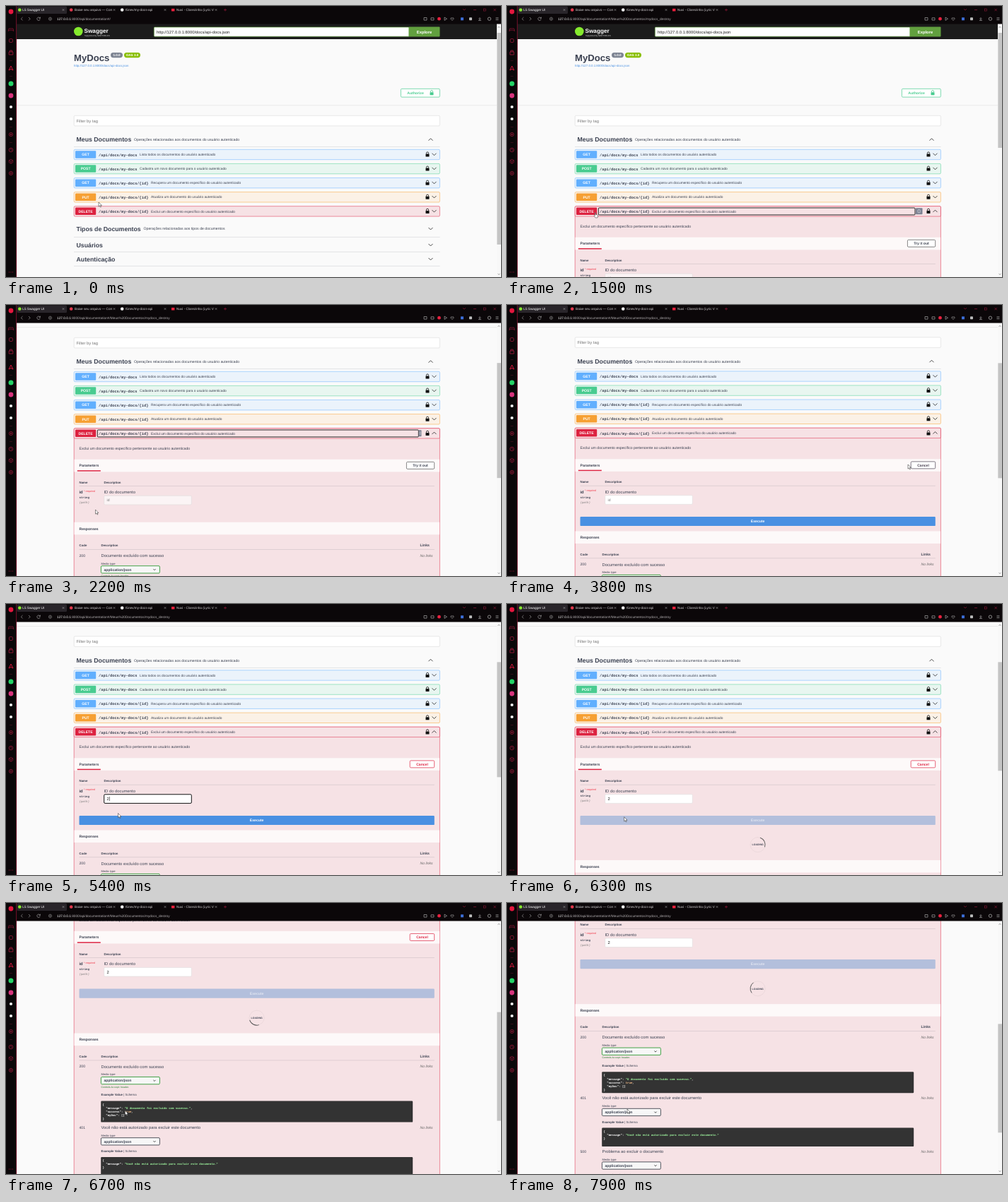
An HTML page that plays this animation: 700 px wide and 384 px high, repeating every 8 s.

```html
<!DOCTYPE html>
<html lang="pt-BR">
<head>
<meta charset="utf-8">
<title>MyDocs</title>
<style>
html, body { margin: 0; width: 100%; height: 100%; overflow: hidden; background: #0b0709; }
svg { display: block; }
text { font-family: "Liberation Sans", Arial, sans-serif; white-space: pre; text-rendering: geometricPrecision; }
.b { font-weight: bold; }
.i { font-style: italic; }
.m { font-family: "Liberation Mono", monospace; }
.c { text-anchor: middle; }
</style>
</head>
<body>
<svg id="stage" width="700" height="384" viewBox="0 0 700 384"></svg>
<script>
const LOOP = 8000, INK = '#3b4151', RED = '#dd2240', GREEN = '#49cc90', PINK = '#f6e2e5', CRIMSON = '#a81a3d';
const OPEN = 1100, TRY = 3700, FOCUS = 4950, TYPE = 5250, RUN = 6200;

// Markup helpers: text is placed by its vertical middle
const rect = (x, y, w, h, fill, more = '') =>
  `<rect x="${x}" y="${y}" width="${w}" height="${h}" fill="${fill}" ${more}/>`;
const box = (x, y, w, h, fill, stroke, width = .5, r = 1.4, more = '') =>
  rect(x, y, w, h, fill, `stroke="${stroke}" stroke-width="${width}" rx="${r}" ${more}`);
const text = (x, y, size, str, fill = INK, cls = '', more = '') =>
  `<text x="${x}" y="${y + size * .35}" font-size="${size}" fill="${fill}" class="${cls}" ${more}>${str}</text>`;
const line = (d, stroke, width = .6, more = '') =>
  `<path d="${d}" fill="none" stroke="${stroke}" stroke-width="${width}" ${more}/>`;
const dot = (x, y, r, fill, more = '') => `<circle cx="${x}" cy="${y}" r="${r}" fill="${fill}" ${more}/>`;
const ring = (x, y, r, stroke, width = .7) => dot(x, y, r, 'none', `stroke="${stroke}" stroke-width="${width}"`);
const group = (id, content) => `<g id="${id}">${content}</g>`;
const chevron = (x, y, up, size = 3) => {
  const k = up ? -1 : 1;
  return line(`M${x - size} ${y - size / 2 * k}l${size} ${size * k}l${size} ${-size * k}`, '#222', .8);
};
const lock = (x, y, fill = '#111') => rect(x - 2.5, y - 1, 5, 4, fill, 'rx=".5"') +
  line(`M${x - 1.6} ${y - 1}v-1a1.6 1.6 0 0 1 3.2 0v1`, fill, .8);
const rule = y => rect(96, y, 517.6, .4, INK, 'opacity=".3"');

function tag(y, name, about = '', x = 0, up = false) {
  return text(99.5, y, 8.75, name, INK, 'b') + text(x, y, 5.18, about) + chevron(600.5, y, up);
}

function operation(y, method, path, about, color, tint) {
  const x = path.includes('{') ? 205 : 189;
  return box(96.2, y - 7.2, 517.2, 14.4, tint, color) + rect(98, y - 5.3, 29.2, 10.5, color, 'rx="1"') +
    text(112.6, y, 5.1, method, '#fff', 'b c') + text(131, y + .3, 5.33, path, INK, 'b m') +
    text(x, y, 4.82, about) + lock(596, y);
}

function browser() {
  const tabs = [
    [97, 'Baixe seu arquivo — Com', '#e0384c', 153], [169, 't5nev/my-docs-api', '#eee', 225],
    [241, 'Nuvi - Clarezinha (Lyric V', '#f0203c', 297]
  ];
  const cross = x => line(`M${x - 1.3} 4.2l2.6 2.6m0 -2.6l-2.6 2.6`, '#bbb', .5);
  let s = rect(0, 0, 700, 25.5, '#0b0709') + rect(0, 0, 14.5, 384, '#0b0709') +
    rect(15.5, .5, 70.5, 10.5, '#29252a', 'rx="1.5"') + dot(19.3, 5.5, 2.3, '#85ea2d') +
    text(23.3, 5.6, 4.7, 'L5 Swagger UI', '#fff') + cross(81);
  for (const [x, title, color, end] of tabs) {
    s += (x === 241 ? rect(x - 7, 3.8, 4.4, 3.6, color) : dot(x - 4.8, 5.5, 2.3, color)) +
      text(x, 5.6, 4.7, title, '#d5d2d4') + rect(end - 3, 1, 6, 9, '#0b0709') + cross(end);
  }
  s += line('M308 5.5h4m-2 -2v4', CRIMSON) +
    line('M646 4l2 2l2 -2M661 5.5h4M689.5 3.8l3.4 3.4m0 -3.4l-3.4 3.4', CRIMSON) +
    box(675.5, 4, 3, 3, 'none', CRIMSON, .5, 0) +
    line('M23.5 16l-2.2 2.2l2.2 2.2M32 16l2.2 2.2l-2.2 2.2', '#bbb') +
    line('M48 17.2a2.2 2.2 0 1 0 .2 1.6M48.4 15.6v1.8h-1.8', '#bbb') +
    ring(62.5, 18.2, 2.2, '#999', .5) + line('M60.3 18.2h4.4M62.5 16v4.4', '#999', .4) +
    `<text x="72" y="19.9" font-size="4.75" fill="#fff">127.0.0.1<tspan fill="#b3afb1">:8000/api/documentation#/<tspan id="hash"></tspan></tspan></text>`;
  s += line('M591 16.5h4v3.6h-4zM601 16.8h4v3.2h-4z', '#bbb') + dot(612.5, 18.2, 2.4, '#e8213f') +
    line('M620 16l3.6 2.2l-3.6 2.2z', '#bbb') +
    line('M631 20.4l-2.2 -2.2q0 -2.2 2.2 -1q2.2 -1.2 2.2 1z', '#bbb') +
    rect(643, 16.3, 4, 4, '#3c6fd8') + rect(655, 16.3, 4, 4, '#bbb', 'rx=".8"') +
    line('M670 16v3.2m-1.6 -1.4l1.6 1.6l1.6 -1.6M668 20.5h4', '#bbb') + ring(683.5, 18.2, 2.2, '#bbb') +
    line('M692.5 16.6h4m-4 1.6h4m-4 1.6h4', '#bbb', .5);

  s += dot(7, 8, 3.4, '#e3173e') + rect(14.3, 0, .8, 384, '#8d1434') +
    line('M4 32h6l.8 3.5l-2 -1.3h-3.6l-2 1.3z', CRIMSON) + box(4.5, 46.5, 5, 5, 'none', CRIMSON, .7) +
    line('M4.2 65h5.6v4h-5.6zM5.5 65v-2h3v2', CRIMSON, .8) + line('M4 91l3 -6l3 6l-3 -1.6z', '#e3173e', .9) +
    dot(7, 110, 3.5, '#25d366') + dot(7, 127, 3.4, '#d8327c') + dot(7, 143, 2.1, '#eee') + dot(7, 160, 2.1, '#eee') +
    ring(7, 182, 2.6, CRIMSON) + dot(7, 182, 1, CRIMSON) + ring(7, 204, 2.8, CRIMSON) + line('M7 202v2l1.5 1', CRIMSON) +
    line('M7 217.2l2.7 1.5v3l-2.7 1.5l-2.7 -1.5v-3zM4.3 218.7l2.7 1.5l2.7 -1.5M7 220.2v3', CRIMSON) +
    ring(7, 237, 2.6, CRIMSON) + ring(7, 237, .9, CRIMSON);
  for (const y of [77, 99, 171, 193]) s += rect(5, y, 4, .5, '#5b1226');
  return s + [4.5, 7, 9.5].map(x => dot(x, 377, .6, CRIMSON)).join('');
}

function header() {
  const address = 'http://127.0.0.1:8000/docs/api-docs.json';
  return rect(15, 25, 679, 22, '#1b1b1b') + dot(102.3, 36, 6.3, '#85ea2d') +
    text(110.5, 35, 8.2, 'Swagger', '#fff', 'b') + text(111, 42, 2.9, 'Supported by NORTHELKS', '#ddd') +
    box(209.3, 30, 361, 13.2, '#fff', '#62a03f', .7, 1) + text(213, 36.5, 5.83, address, '#222') +
    rect(569.5, 29.6, 44, 14, '#62a03f', 'rx="1"') + text(591.5, 36.6, 5.83, 'Explore', '#fff', 'b c') +
    text(96, 73, 13.1, 'MyDocs', INK, 'b') +
    rect(148, 66, 17, 7.2, '#7d8492', 'rx="3.6"') + text(156.5, 69.6, 4.6, '1.0.0', '#fff', 'b c') +
    rect(167, 66, 23, 7.2, '#89bf04', 'rx="3.6"') + text(178.5, 69.6, 4.6, 'OAS 3.0', '#fff', 'b c') +
    text(96, 84.8, 4.37, address, '#4990e2') + rect(15, 140.6, 679, .5, '#d9d9d9') +
    box(558.4, 117.3, 55, 11.8, '#fff', GREEN, .7) + text(579, 123.4, 5.1, 'Authorize', GREEN, 'b c') + lock(602, 123.2, GREEN) +
    box(96.2, 155.3, 517.2, 14.6, '#fff', '#d0d0d0') + text(99.5, 162.6, 5.83, 'Filter by tag', '#757575');
}

function operations() {
  const list = '/api/docs/my-docs', one = list + '/{id}';
  const rows = [
    ['GET', list, 'Lista todos os documentos do usuário autenticado', '#61affe', '#ebf3fb'],
    ['POST', list, 'Cadastra um novo documento para o usuário autenticado', GREEN, '#e8f6f0'],
    ['GET', one, 'Recupera um documento específico do usuário autenticado', '#61affe', '#ebf3fb'],
    ['PUT', one, 'Atualiza um documento do usuário autenticado', '#f6a033', '#fbf1e6'],
    ['DELETE', one, 'Exclui um documento específico do usuário autenticado', RED, PINK]
  ];
  return tag(189.2, 'Meus Documentos', 'Operações relacionadas aos documentos do usuário autenticado', 181, true) + rule(199.5) +
    group('body', box(96.2, 283.8, 517.2, 560, PINK, RED)) +
    rows.map((row, i) => operation(210.5 + 20.1 * i, ...row) + (i < 4 ? chevron(605.5, 210.2 + 20.1 * i) : '')).join('') +
    group('closed', chevron(605.5, 290.6) +
      tag(315.5, 'Tipos de Documentos', 'Operações relacionadas aos tipos de documentos', 194.5) + rule(327.5) +
      tag(338.5, 'Usuários') + rule(348) + tag(358.5, 'Autenticação') + rule(368.5)) +
    box(129.3, 286, 448, 10, 'none', '#111', .9, 1, 'id="outline"') +
    group('copy', rect(0, 286.3, 9.5, 9, '#7d8293', 'rx="1"') + box(3, 288.7, 3.2, 4, 'none', '#fff', .5, .4));
}

function parameters() {
  return chevron(605.5, 290.6, true) +
    text(103.5, 311.8, 5.18, 'Exclui um documento específico pertencente ao usuário autenticado') +
    rect(96.5, 327.8, 516.6, 17.6, '#fdf9f9') + text(103.5, 336.4, 5.1, 'Parameters', INK, 'b') +
    rect(100.8, 343.2, 33, 1.5, RED) +
    group('try', box(566.4, 331.4, 39.3, 10, '#fff', '#555', .7) + text(586, 336.4, 5.1, 'Try it out', INK, 'b c')) +
    group('cancel', box(571.2, 331.4, 34.5, 10, '#fff', 'currentColor', .7) + text(588.5, 336.4, 5.1, 'Cancel', 'currentColor', 'b c')) +
    text(103.5, 360, 4.37, 'Name', INK, 'b') + text(138.5, 360, 4.37, 'Description', INK, 'b') +
    rect(103.5, 365.4, 502.3, .4, INK, 'opacity=".3"') +
    text(103.5, 374, 5.83, 'id', INK, 'b') + text(110, 372.3, 3.65, '* required', '#f03040') +
    text(103.5, 381.6, 4, 'string', INK, 'b m') + text(103.5, 388.6, 4, '(path)', '#777', 'm i') +
    text(138.5, 374, 5.83, 'ID do documento') +
    box(138.7, 379.3, 123.6, 12.6, '#fff', '#d9d9d9', .5, 1.4, 'id="field"') +
    text(142.5, 385.6, 5.1, 'id', '#777', '', 'id="hint"') + text(142.5, 385.6, 5.8, '2', '#222', '', 'id="typed"') +
    rect(146, 382.4, .5, 6.2, '#111', 'id="caret"') +
    group('execute', rect(103.5, 409.4, 502.3, 13.2, '#4990e2', 'rx="1.2" id="bar"') +
      text(354.6, 416, 5.1, 'Execute', '#fff', 'b c', 'id="label"')) +
    group('loading', ring(354.6, 450.6, 10.5, '#55555518') +
      line('M347.18 443.18a10.5 10.5 0 0 1 14.84 0', '#555', .9, 'id="arc"') +
      text(354.6, 450.6, 3.5, 'LOADING', INK, 'b c'));
}

// Responses are laid out around the middle of their title bar
function responses() {
  const str = s => `<tspan fill="#a2fca2">${s}</tspan>`;
  const code = (y, h, lines) => rect(134.2, y, 441, h, '#333', 'rx="1.2"') +
    lines.map((s, i) => text(136.5, y + 4.8 + 5.15 * i, 4, s, '#fff', 'b m')).join('');
  const response = (y, status, about, accent) => {
    const first = accent ? 1 : 0;
    return text(103.5, y, 5.1, status) + text(134.5, y, 5.83, about) + text(585.5, y, 5.1, 'No links', '#666', 'i') +
      text(134.5, y + 11.5, 4.1, 'Media type') +
      box(134.4, y + 14.9, 83, 10.3, '#f7f7f7', accent || '#41444e', .9) +
      text(138.5, y + 20.1, 5.1, 'application/json', INK, 'b') + chevron(210, y + 20.1, false, 1.6) +
      (first ? text(134.5, y + 29, 3.5, 'Controls <tspan class="m">Accept</tspan> header.', '#1f7a2a') : '') +
      text(134.5, y + 33.8 + 6.5 * first, 4.37, '<tspan class="b">Example Value</tspan> | Schema');
  };
  return rect(96.5, -9, 516.6, 17.5, '#fdf9f9') + text(103.5, 0, 5.1, 'Responses', INK, 'b') +
    text(103.5, 23.5, 4.37, 'Code', INK, 'b') + text(134.5, 23.5, 4.37, 'Description', INK, 'b') +
    text(585.5, 23.5, 5.1, 'Links', INK, 'b') + rect(103.5, 29.2, 502.3, .4, INK, 'opacity=".3"') +
    response(38, '200', 'Documento excluído com sucesso', '#2f9a36') +
    code(87, 30, ['{', `  "message": ${str('"O documento foi excluído com sucesso."')},`,
      '  "success": <tspan fill="#fcc28c">true</tspan>,', '  "myDoc": []', '}']) +
    response(124.2, '401', 'Você não está autorizado para excluir este documento') +
    code(166.4, 26.5, ['{', `  "message": ${str('"Você não está autorizado para excluir este documento."')}`, '}']) +
    response(199.8, '500', 'Problema ao excluir o documento');
}

document.getElementById('stage').innerHTML =
  rect(15, 25, 685, 359, '#fafafa') +
  `<svg x="15" y="25" width="679" height="359" viewBox="15 25 679 359">` +
  group('page', header() + operations() + group('open', parameters() + group('responses', responses()))) + '</svg>' +
  rect(694, 25, 6, 359, '#f8f8f8') + line('M695.5 31l1.5 -2l1.5 2M695.5 379l1.5 2l1.5 -2', '#888') +
  rect(694.4, 38, 5.6, 300, '#c4c4c4', 'id="thumb"') + browser() +
  group('cursor',
    '<path id="arrow" d="M0 0v6.2l1.5 -1.3l1 2.2l1 -.5l-1 -2.1h1.9z" fill="#fff" stroke="#222" stroke-width=".5"/>' +
    '<path id="hand" d="M-.6 0q.6 -.8 1.2 0v2.4l2.6 .6q.6 .3 .4 1.2l-.6 2.8h-3l-2 -2.6q0 -1 1.4 -.2z" fill="#fff" stroke="#222" stroke-width=".5"/>');

const el = Object.fromEntries([...document.querySelectorAll('[id]')].map(e => [e.id, e]));
const show = (name, on) => el[name].style.display = on ? '' : 'none';
const set = (name, values) => { for (const k in values) el[name].setAttribute(k, values[k]); };
const ramp = (t, a, b) => Math.min(1, Math.max(0, (t - a) / (b - a)));
const ease = (t, a, b) => { const u = ramp(t, a, b); return u * u * (3 - 2 * u); };

const path = [
  [100, 131, 278], [500, 130, 280], [650, 130, 280], [800, 125, 293], [2000, 125, 293], [2200, 126.5, 290],
  [2700, 154, 282], [2950, 154, 282], [3500, 567, 226], [4350, 567, 226], [4900, 150, 278], [5100, 150, 278],
  [5400, 158.5, 296.5], [5750, 158.5, 296.5], [6000, 165, 304], [6200, 165, 304], [6500, 167.5, 295.5], [7000, 170, 292]
];
function pointer(t) {
  let [, x, y] = path[0];
  for (let i = 1; i < path.length; i++) {
    const u = ease(t, path[i - 1][0], path[i][0]);
    x += (path[i][1] - path[i - 1][1]) * u;
    y += (path[i][2] - path[i - 1][2]) * u;
  }
  return `translate(${x} ${y})`;
}

function draw(t) {
  const open = t >= OPEN, trying = t >= TRY, running = t >= RUN;
  const focused = t >= FOCUS && !running, typed = t >= TYPE;
  const scroll = 109.5 * ease(t, 1980, 2210) + 219.8 * ease(t, 6300, 6855);

  set('page', { transform: `translate(0 ${-scroll})` });
  set('thumb', { y: 38 + scroll * .405, height: !open ? 300 : running ? 154 : 163 });
  el.hash.textContent = open ? 'Meus%20Documentos/mydocs_destroy' : '';
  show('closed', !open);
  show('body', open);
  show('open', open);

  const copy = ramp(t, 680, 800) * (1 - ramp(t, 2050, 2300));
  set('copy', { transform: `translate(${587.5 - 9.5 * copy} 0) scale(${copy} 1)` });
  set('outline', { width: 458.2 - 10.5 * copy });
  show('copy', copy > 0);
  show('outline', open && !trying);

  show('try', !trying);
  show('cancel', trying);
  const k = ramp(t, 3780, 4050);
  el.cancel.style.color = `rgb(${59 + 162 * k},${65 - 31 * k},${81 - 17 * k})`;
  set('field', { fill: trying ? '#fff' : '#fbf4f5', stroke: focused ? '#111' : '#d9d9d9', 'stroke-width': focused ? 1 : .5 });
  show('hint', !typed);
  show('typed', typed);
  show('caret', focused && (t - (typed ? TYPE : FOCUS)) % 1060 < 530);
  set('caret', { x: typed ? 146 : 142.3 });

  show('execute', trying);
  show('loading', running);
  set('bar', { fill: running ? '#b3bfdc' : '#4990e2' });
  set('label', { fill: running ? '#e0e4f0' : '#fff' });
  set('arc', { transform: `rotate(${135 + (t - 6500) * .36} 354.6 450.6)` });
  set('responses', { transform: `translate(0 ${running ? 481.5 : trying ? 439 : 425.8})` });

  const hand = [[740, 2060], [3480, TRY], [5900, RUN]].some(([a, b]) => t >= a && t < b);
  set('cursor', { transform: pointer(t) });
  show('hand', hand);
  show('arrow', !hand);
}

function tick() {
  draw(performance.now() % LOOP);
  requestAnimationFrame(tick);
}
tick();
</script>
</body>
</html>
```
